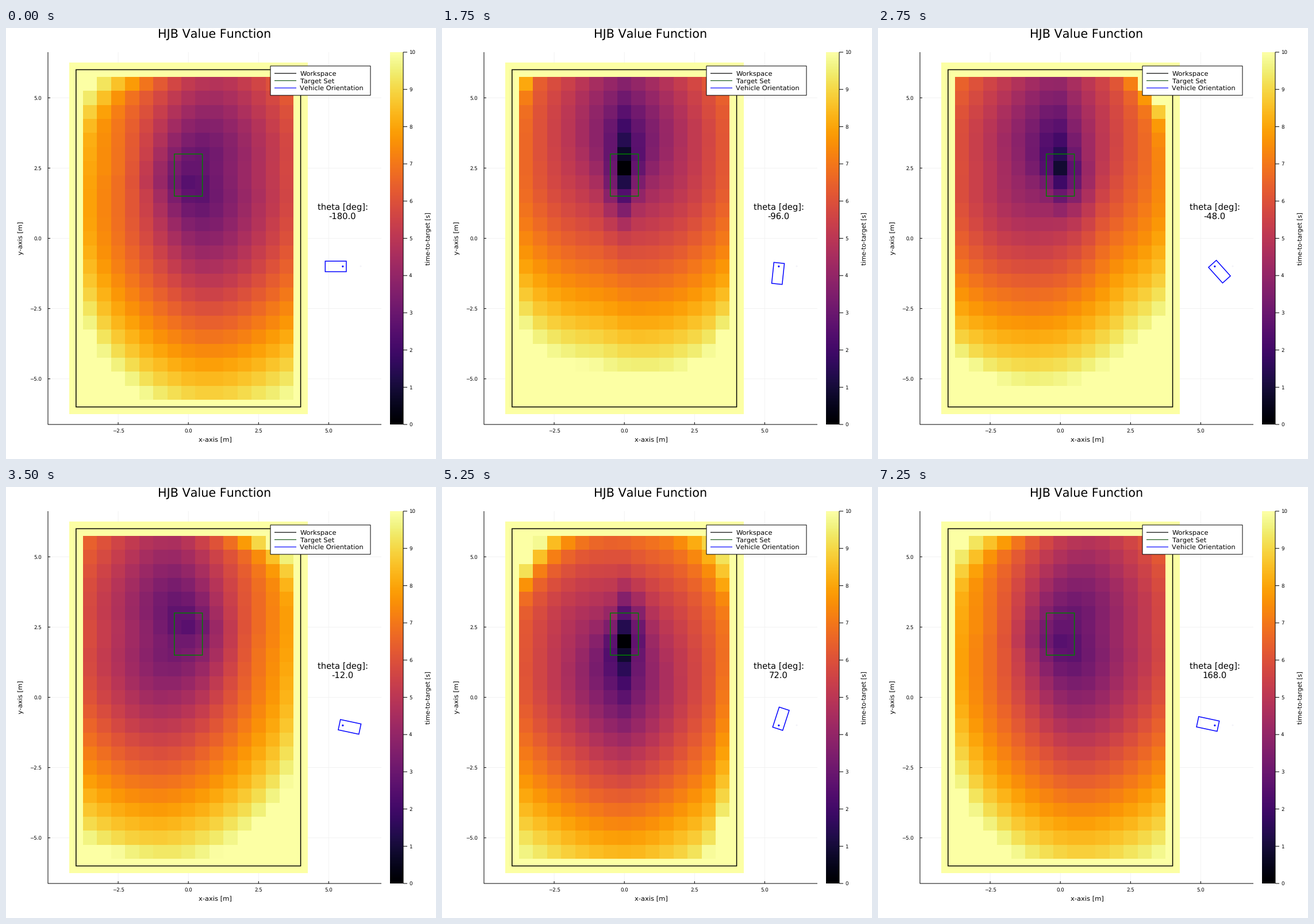
A matplotlib script that plays this animation: 748x749 px, repeating every 7.5 s.

```python
import numpy as np
import matplotlib.pyplot as plt
from matplotlib.animation import FuncAnimation
from matplotlib.patches import Circle, Polygon, Rectangle

W, H, DPI = 748, 749, 100
FRAMES, INTERVAL = 30, 250
PT = 72 / DPI
X0, Y0, SCALE = 317.2, 365.5, 48.84    # pixel origin and pixels per metre
LEFT, RIGHT, TOP, BOTTOM = 73, 653, 42, 689

STEP, TURN = 0.5, np.radians(12)
SPEEDS, CURVATURE = (1.0, -0.5), np.tan(np.pi / 6) / 0.5
BLOCKED = 50.0
REAR, FRONT, HALF = -0.125, 0.625, 0.1875  # body extents from the rear axle
BODY = np.array([(REAR, -HALF), (FRONT, -HALF), (FRONT, HALF), (REAR, HALF)])
POSE = (5.5, -1.0)

plt.rcParams.update({"path.snap": False, "text.kerning_factor": 6, "text.hinting": "none"})


def px(x):
    return X0 + SCALE * np.asarray(x)


def py(y):
    return Y0 - SCALE * np.asarray(y)


def turned(points, theta):
    c, s = np.cos(theta), np.sin(theta)
    return points @ np.array([(c, s), (-s, c)])


def target_mask(theta, x, y):
    """True where the whole body lies inside the target box."""
    mask = np.zeros((len(theta), len(y), len(x)), bool)
    eps = 1e-9
    for k, angle in enumerate(theta):
        lo, hi = turned(BODY, angle).min(0), turned(BODY, angle).max(0)
        in_x = (x + lo[0] >= -0.5 - eps) & (x + hi[0] <= 0.5 + eps)
        in_y = (y + lo[1] >= 1.5 - eps) & (y + hi[1] <= 3 + eps)
        mask[k] = in_y[:, None] & in_x[None, :]
    return mask


def solve():
    """Time-to-target by upwind value iteration on a (theta, y, x) grid."""
    x = np.arange(-4, 4.01, STEP)
    y = np.arange(-6, 6.01, STEP)
    theta = -np.pi + TURN * np.arange(FRAMES - 1)
    goal = target_mask(theta, x, y)
    c = np.cos(theta)[:, None, None]
    s = np.sin(theta)[:, None, None]
    value = np.where(goal, 0, BLOCKED)
    inner = (slice(None), slice(1, -1), slice(1, -1))
    for _ in range(1500):
        xp, xn = np.roll(value, -1, 2), np.roll(value, 1, 2)
        yp, yn = np.roll(value, -1, 1), np.roll(value, 1, 1)
        tp, tn = np.roll(value, -1, 0), np.roll(value, 1, 0)
        best = value
        for v in SPEEDS:
            wx, wy = abs(v * c) / STEP, abs(v * s) / STEP
            wt = abs(v) * CURVATURE / TURN
            cost = 1 + wx * np.where(v * c > 0, xp, xn) + wy * np.where(v * s > 0, yp, yn)
            best = np.minimum(best, cost / (wx + wy))
            best = np.minimum(best, (cost + wt * np.minimum(tp, tn)) / (wx + wy + wt))
        new = value.copy()
        new[inner] = best[inner]
        change = np.max(value - new)
        value = new
        if change < 1e-4:
            break
    return value


value = solve()

fig = plt.figure(figsize=(W / DPI, H / DPI), dpi=DPI, facecolor="white")
ax = fig.add_axes([0, 0, 1, 1])
ax.axis("off")


def line(xs, ys, color="black", width=1.0, z=3):
    ax.plot(xs, ys, color=color, lw=width * PT, zorder=z,
            solid_capstyle="butt", solid_joinstyle="miter")


def text(x, y, label, size, ha="center", va="baseline", **kw):
    return ax.text(x, y, label, fontsize=size * PT, family="DejaVu Sans",
                   ha=ha, va=va, zorder=8, **kw)


def box(x0, x1, y0, y1, color, width):
    ax.add_patch(Rectangle((px(x0), py(y1)), SCALE * (x1 - x0), SCALE * (y1 - y0),
                           fill=False, ec=color, lw=width * PT, zorder=4, snap=False))


def signed(v):
    return f"{v:.1f}".replace("-", "\u2212")


# Grid, axes and tick labels
for v in (-2.5, 0, 2.5, 5):
    line([px(v)] * 2, [TOP, BOTTOM], "#f0f0f0", 0.8, 0)
    line([px(v)] * 2, [BOTTOM, BOTTOM - 4])
    text(px(v), 703, signed(v), 8.6)
for v in (-5, -2.5, 0, 2.5, 5):
    line([LEFT, RIGHT], [py(v)] * 2, "#f0f0f0", 0.8, 0)
    line([LEFT, LEFT + 4], [py(v)] * 2)
    text(62, py(v) + 3.2, signed(v), 8.6, ha="right")
line([LEFT, LEFT, RIGHT], [TOP, BOTTOM, BOTTOM])

text(363, 18, "HJB Value Function", 20.75)
text(363.5, 719, "x-axis [m]", 11.5)
text(26, 365.5, "y-axis [m]", 11.5, va="center", rotation=90)
text(734.5, 365.5, "time-to-target [s]", 10.6, va="center", rotation=90)

# Value cells, with edges on whole pixels
heat = ax.pcolormesh(np.round(px(np.arange(-4.25, 4.3, STEP))),
                     np.round(py(np.arange(-6.25, 6.3, STEP))),
                     value[0], cmap="inferno", vmin=0, vmax=10,
                     antialiased=False, zorder=1)
box(-4, 4, -6, 6, "black", 1.5)
box(-0.5, 0.5, 1.5, 3, "green", 1.5)

# Colour bar
ax.imshow(np.linspace(1, 0, 256)[:, None], cmap="inferno", aspect="auto",
          extent=(668, 691, BOTTOM, TOP), zorder=1)
line([691, 691], [TOP, BOTTOM])
for n in range(11):
    level = BOTTOM - (BOTTOM - TOP) * n / 10
    line([691, 698], [level] * 2)
    text(701, level + 3.2, str(n), 8.6, ha="left")

# Legend
ax.add_patch(Rectangle((460, 66), 174, 51, fc="white", ec="black", lw=PT,
                       zorder=6, snap=False))
entries = (("Workspace", "black"), ("Target Set", "#1c5a1c"), ("Vehicle Orientation", "blue"))
for n, (label, color) in enumerate(entries):
    level = 78.8 + 12.7 * n
    line([467, 505], [level] * 2, color, 1.2, 7)
    text(511.5, level + 4.1, label, 11.45, ha="left")

# Vehicle
ax.add_patch(Circle((617, 414), 1.5, color="#f3f3f8", lw=0, zorder=2))
ax.add_patch(Circle((px(POSE[0]), py(POSE[1])), 1.6, color="blue", lw=0, zorder=5))
car = Polygon(np.zeros((4, 2)), fill=False, ec="blue", lw=1.5 * PT, zorder=4, snap=False)
ax.add_patch(car)
text(586, 316, "theta [deg]:", 14.75)
angle_text = text(585.3, 332, "", 14.75)

ax.set_xlim(0, W)
ax.set_ylim(H, 0)
ax.set_aspect("auto")


def draw(i):
    degrees = -180.0 + 12 * i
    heat.set_array(value[i % len(value)])
    corners = turned(BODY, np.radians(degrees)) + POSE
    car.set_xy(np.column_stack([px(corners[:, 0]), py(corners[:, 1])]))
    angle_text.set_text(f"{degrees:.1f}")
    return heat, car, angle_text


anim = FuncAnimation(fig, draw, frames=FRAMES, interval=INTERVAL, repeat=True)
plt.show()
```
